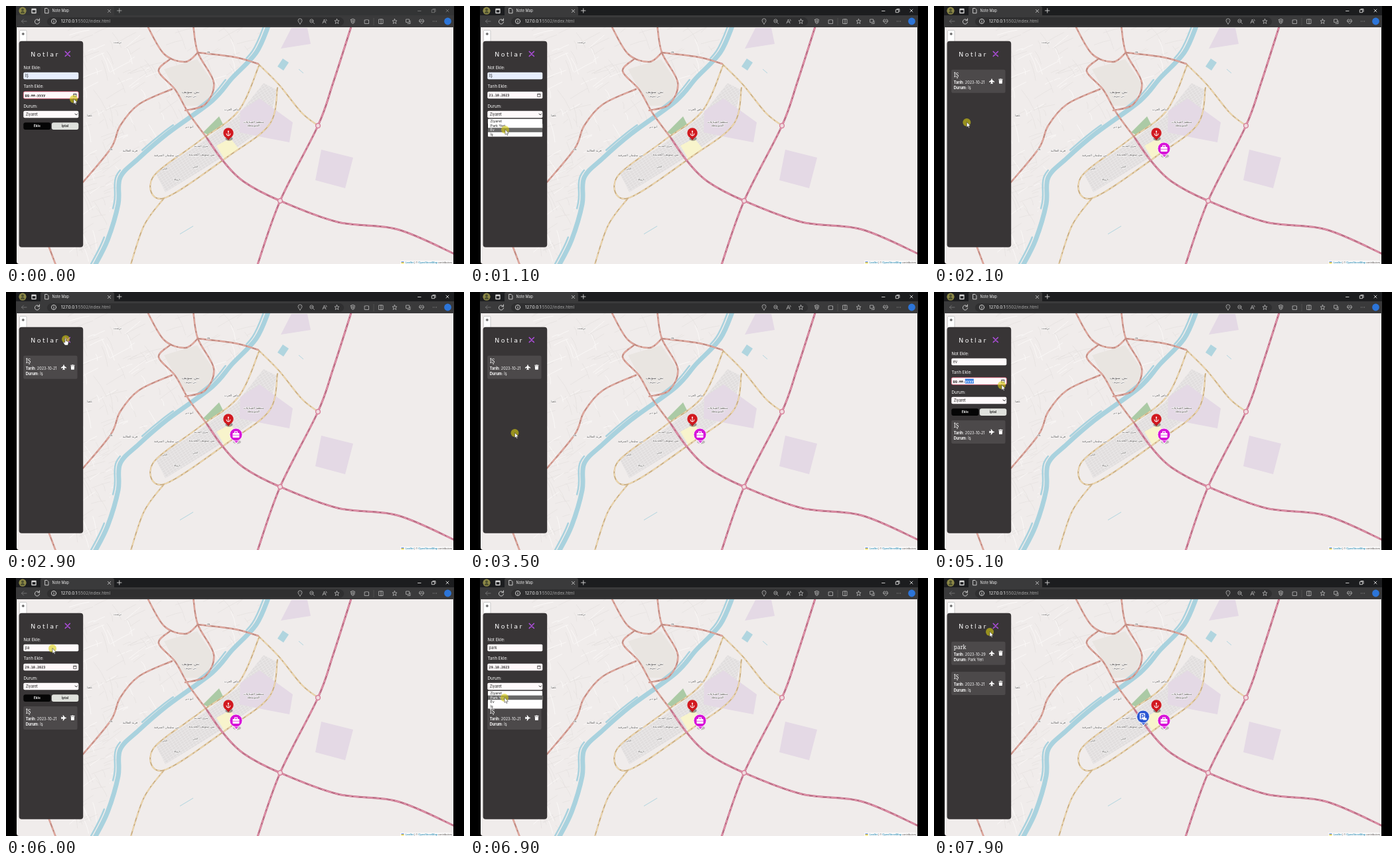
Recreate the animation shown at these times as an HTML page. Size 690 px wide and 388 px high, loop 8000 ms.

```html
<!DOCTYPE html>
<html lang="tr">
<head>
<meta charset="utf-8">
<title>Note Map</title>
<style>
  html, body { margin: 0; width: 100%; height: 100%; overflow: hidden; background: #000; }
  svg { display: block; width: 100%; height: 100%; }
  .ui text { font-family: Inter, "Open Sans", sans-serif; }
  .map text { font-family: "DejaVu Sans", sans-serif; text-anchor: middle; fill: #55504f; }
  .mono { font: bold 5.1px "DejaVu Sans Mono", monospace !important; }
  .field { font-size: 5.6px; fill: #222; }
  .label { font-size: 6.2px; fill: #fff; }
  .line { fill: none; stroke-linecap: round; stroke-linejoin: round; }
</style>
</head>
<body>
<svg viewBox="0 0 690 388" preserveAspectRatio="none">
  <defs>
    <clipPath id="view"><path d="M16 32H674V388H20Q16 388 16 384Z"/></clipPath>
    <clipPath id="west"><path d="M16 32H388L330 124 172 250 137 388H16Z"/></clipPath>
    <pattern id="blocks" width="5" height="3.5" patternUnits="userSpaceOnUse" patternTransform="rotate(-33)">
      <rect width="5" height="3.5" fill="#e0dddd"/>
      <path d="M0 .5H5M.5 0V3.5" stroke="#eceaea" stroke-width=".7"/>
    </pattern>
    <g id="plane" fill="#fff">
      <path d="M0-4.2Q.9-3.5.9-1.6L4 .4V1.5L.9.8 1.8 4 0 3.6-1.8 4-.9.8-4 1.5V.4L-.9-1.6Q-.9-3.5 0-4.2Z"/>
    </g>
    <g id="trash" fill="#fff">
      <path d="M-3.1-3.2H-1.2L-.8-3.8H.8L1.2-3.2H3.1V-2.3H-3.1ZM-2.7-1.7H2.7L2.3 3.7H-2.3Z"/>
    </g>
    <g id="pin">
      <ellipse cx="1.5" cy="11" rx="6" ry="3" fill="#444" opacity=".3"/>
      <path d="M-7 6 .5 14.5 7 6Z" fill="#fff"/>
      <path d="M-4 8 .5 12.5 5 8Z"/>
      <circle r="9.5" stroke="#fff" stroke-width=".8"/>
    </g>
  </defs>

  <rect width="690" height="388" fill="#000"/>

  <g class="map" clip-path="url(#view)">
    <rect x="15" y="32" width="660" height="356" fill="#f0eceb"/>
    <g id="fields" clip-path="url(#west)"></g>
    <path d="M238 95 288 80 314 118 300 150 268 150Z" fill="#e9e5e1"/>
    <path d="M225 250 292 207 348 166 388 116 408 126 396 178 332 224 240 280Z" fill="url(#blocks)"/>
    <g fill="#e4d9e5">
      <path d="M353 158 382 139 432 175 427 205 390 198 352 190Z"/>
      <path d="M475 216 523 228 511 274 466 262Z"/>
      <path d="M414 64 430 33H454L459 57Z"/>
    </g>
    <path d="M297 190 321 166 328 180 305 194Z" fill="#abcaa5"/>
    <path d="M317 210 338 199 351 215 329 230Z" fill="#f8f4cc"/>
    <path d="M417 79 426 85 418 97 409 91Z" fill="#b0d5df"/>
    <path d="M262 343 282 331M441 95 448 101" stroke="#b0d5df"/>
    <g id="roads"></g>
    <g id="places"></g>

    <g transform="translate(335 191)">
      <ellipse cx="1" cy="8.5" rx="5.5" ry="3.2" fill="#333" opacity=".45"/>
      <path d="M-5 5 0 11 5 5Z" fill="#b5161c"/>
      <circle r="7.7" fill="#d2191f"/>
      <path class="line" d="M0-2.5V4M-3 1Q-3 4 0 4 3 4 3 1" stroke="#fff"/>
      <circle cy="-2.5" r="1.1" fill="#fff"/>
    </g>
    <g id="parkPin" transform="translate(315 208.5)">
      <use href="#pin" fill="#2b57d3"/>
      <rect x="-5" y="-5" width="8" height="9" rx="1" fill="#fff"/>
      <path d="M-2.8 3V-3H-.7Q1.5-3 1.5-1.3T-.7.4H-2.8" fill="none" stroke="#2b57d3" stroke-width="1.3"/>
      <rect y="2" width="5.4" height="3" fill="#fff"/>
    </g>
    <g id="workPin" transform="translate(346.5 214.5)">
      <use href="#pin" fill="#d714d8"/>
      <rect x="-5" y="-2.6" width="10" height="7" rx="1" fill="#fff"/>
      <path d="M-2-2.6V-4.4H2V-2.6" fill="none" stroke="#fff" stroke-width="1.1"/>
      <path d="M-5 .8H5" stroke="#d714d8" stroke-width=".7"/>
    </g>

    <rect x="594" y="383" width="80" height="5" fill="#fff" opacity=".75"/>
    <path d="M595.5 384.3h4v1.4h-4Z" fill="#4c7be1"/><path d="M595.5 385.7h4v1.3h-4Z" fill="#ffd500"/>
    <text x="637" y="387" style="font:4.05px 'Liberation Sans',sans-serif"><tspan fill="#0078a8">Leaflet</tspan> | © <tspan fill="#0078a8">OpenStreetMap</tspan> contributors</text>
    <rect x="20.5" y="36.5" width="10.5" height="22" rx="1.5" fill="#fff" stroke="#bbb" stroke-width=".7"/>
    <path d="M23.7 42H27.9M25.8 39.9V44.1" stroke="#222" stroke-width=".9"/>
  </g>

  <g class="ui">
    <rect id="titleBar" x="15" width="660" height="15"/>
    <path d="M15 14H52V3Q52 0 55 0H160Q163 0 163 3V14H675V32H15Z" fill="#3a3a3b"/>
    <rect x="62" y="17" width="447" height="13" rx="6.5" fill="#2f2f30"/>
    <circle cx="25" cy="7.2" r="5.6" fill="#8c8847"/>
    <path d="M25 3.5a1.7 1.7 0 0 1 0 4Q28 8 28 11H22Q22 8 25 7.5a1.7 1.7 0 0 1 0-4Z" fill="#4e5130"/>
    <g class="line" stroke="#d8d8d8" stroke-width=".9">
      <path d="M39 4.5H45V10.5H39ZM39 5.5H45" stroke-width="1.3"/>
      <path d="M59 3.5H62L64 5.5V10.8H59Z"/>
      <path id="tabSigns" d="M153.5 5.5l4 4m0-4l-4 4M167.5 7h6.5m-3.2-3.2v6.4"/>
      <path id="windowSigns" d="M620.5 7.5h4.5M641.7 5.7h4v4h-4ZM643 4.5h4v4M663 5l4 4m0-4l-4 4"/>
      <path d="M31 23h-7.5m3-3l-3 3 3 3" stroke="#777"/>
      <path d="M50 21.5A3.6 3.6 0 1 0 50.6 24M50.5 19v2.8h-2.8"/>
      <circle cx="72" cy="23" r="3.6"/><path d="M72 22.5V25M72 21v.1"/>
    </g>
    <text x="69.5" y="9.4" font-size="5.5" fill="#e8e8e8">Note Map</text>
    <text x="83" y="25.3" font-size="6.3" fill="#f2f2f2">127.0.0.1<tspan fill="#a5a5a5">:5502/index.html</tspan></text>
    <g id="tools" class="line" stroke="#b8b8b8" stroke-width=".8"></g>
    <path d="M554 18V29" stroke="#555" stroke-width=".8"/>
    <circle cx="665.5" cy="23" r="5.4" fill="#2c75d9"/>

    <rect x="19.6" y="52.8" width="96.6" height="310" rx="4" fill="#383536"/>
    <text x="37.2" y="76" font-size="9.4" letter-spacing="2.5" fill="#fff" style="font-family:'DejaVu Sans',sans-serif">Notlar</text>
    <path class="line" d="M89.3 68.5l7 7m0-7l-7 7" stroke="#ad4ddb" stroke-width="1.7"/>

    <g id="form">
      <text class="label" x="26.5" y="95">Not Ekle:</text>
      <rect id="noteBox" x="26.3" y="99.7" width="83" height="10.6" rx="2"/>
      <text id="note" class="field" x="28.8" y="107"></text>
      <text class="label" x="26.5" y="123.3">Tarih Ekle:</text>
      <rect id="dateBox" x="26.3" y="128.7" width="83" height="10.6" rx="2" fill="#fff8fa" stroke-width=".8"/>
      <rect id="picked" x="46.8" y="130.6" width="13" height="7" fill="#2f7be5"/>
      <text id="date" class="mono" x="28.6" y="136.2" fill="#222"></text>
      <path d="M101.7 132h4.3v4.5h-4.3Zm0 1.2h4.3" fill="none" stroke="#333" stroke-width=".7"/>
      <text class="label" x="26.5" y="152.6">Durum:</text>
      <rect x="26.3" y="157.8" width="83" height="10.5" rx="2" fill="#fffafb"/>
      <text id="status" class="field" x="29.7" y="165"></text>
      <path class="line" d="M104 162l1.8 2 1.8-2" stroke="#222" stroke-width=".9"/>
      <rect x="26.3" y="175.3" width="41" height="10.8" rx="3" fill="#050505"/>
      <rect x="68.8" y="175.3" width="40.5" height="10.8" rx="3" fill="#dfe1dc"/>
      <g font-size="5" font-weight="600" text-anchor="middle">
        <text x="46.8" y="182.4" fill="#fff">Ekle</text><text x="89" y="182.4" fill="#222">İptal</text>
      </g>
    </g>
    <g id="cards"></g>
    <g id="menu">
      <rect x="27" y="169.8" width="82" height="26.8" rx="1" fill="#fff"/>
      <rect id="hover" x="27" width="82" height="6.6" fill="#676767"/>
      <g id="options"></g>
    </g>
  </g>

  <g id="cursor">
    <circle r="6" fill="#d9cf10" opacity=".6"/>
    <path id="arrow" d="M0-.5V7.5L1.8 5.9 3 8.5 4.2 8 3 5.4H5.4Z" fill="#fff" stroke="#222" stroke-width=".5"/>
    <path id="hand" d="M-1.2-1Q-.4-2 .4-1V2.6L3.8 3.6Q4.4 4 4 6L3.2 9H-1.3L-3.6 5.3Q-3.5 4-1.2 5Z" fill="#fff" stroke="#222" stroke-width=".5"/>
  </g>
</svg>
<script>
const LOOP = 8000, STEP = 100;
const $ = id => document.getElementById(id);
const show = (id, on) => { $(id).style.display = on ? '' : 'none'; };
const between = (t, from, to) => t >= from && t < to;

// Smooth path through a few "x,y" points
function curve(points) {
  const p = points.split(' ').map(s => s.split(',').map(Number));
  return p.slice(1).reduce((d, c, i) => {
    const a = p[i - 1] || p[i], b = p[i], e = p[i + 2] || c;
    const out = k => b[k] + (c[k] - a[k]) / 6, back = k => c[k] - (e[k] - b[k]) / 6;
    return `${d}C${out(0)},${out(1)} ${back(0)},${back(1)} ${c}`;
  }, `M${p[0]}`);
}
const line = (points, color, width, extra = '') =>
  `<path class="line" d="${curve(points)}" stroke="${color}" stroke-width="${width}" ${extra}/>`;

let seed = 17;
const random = () => (seed = seed * 16807 % 2147483647) / 2147483647;

function drawFields() {
  let out = '';
  for (let i = 0; i < 420; i++) {
    const x = 90 + random() * 290, y = 32 + random() * 356;
    const angle = (random() < .55 ? -.45 : 1.15) + (random() - .5) * .5;
    const len = 8 + random() * 30, dx = Math.cos(angle) * len, dy = Math.sin(angle) * len;
    out += `<path d="M${x} ${y}q${dx / 2 + 2} ${dy / 2 - 2} ${dx} ${dy}" fill="none"
      stroke="${i % 3 ? '#dfdad9' : '#fbf9f8'}" stroke-width="${i % 3 ? .5 : .9}"/>`;
  }
  $('fields').innerHTML = out;
}

function drawRoads() {
  const river = '396,28 377,70 341,108 310,143 243,192 200,229 172,258 169,298 153,352 133,392';
  const salmon = [
    '116,265 158,214 172,180 200,148 250,125',
    '212,28 238,72 270,84 289,70',
    '282,28 289,70 313,115 300,148 270,157',
    '289,70 345,77 380,87',
    '247,80 230,98 255,126 275,161 303,199',
    '60,350 76,392',
  ];
  const yellow = [
    '380,87 411,118 445,160 470,180',
    '409,123 397,178 335,226 238,289 221,258 290,204 350,158 381,90',
    '238,289 208,330 187,392',
  ];
  const trunk = [
    '521,28 493,115 470,180 413,293 378,392',
    '303,199 327,233 358,264 413,293 500,325 590,336 678,374',
  ];
  const layer = (list, edge, fill, width, dash) => list.map(p =>
    line(p, edge, width + .9) + line(p, fill, width) +
    line(p, dash, .8, 'stroke-dasharray="3 1 1 5 2 9" opacity=".7"')).join('');
  $('roads').innerHTML =
    line(river, '#a9d2de', 7) +
    line(river, '#a9d2de', 2.5, 'transform="translate(-6 -2)" stroke-dasharray="60 45"') +
    layer(yellow, '#d6b98e', '#f0dcb4', 1.3, '#86653d') +
    layer(salmon, '#c98d85', '#e2aca1', 1.6, '#82544e') +
    layer(trunk, '#c46a86', '#dc90a6', 2.1, '#6c3346') +
    [[470, 180], [413, 293]].map(([x, y]) =>
      `<circle cx="${x}" cy="${y}" r="3.4" fill="#f0dce0" stroke="#d7829b" stroke-width="1.5"/>`).join('');
}

function drawPlaces() {
  const label = (name, x, y, size = 4.5) =>
    `<text x="${x}" y="${y}" font-size="${size}" stroke="#fff" stroke-width="1" paint-order="stroke">${name}</text>`;
  $('places').innerHTML = label('بني سويف', 278, 131, 6) + label('بني سويف', 278, 137, 4) +
    label('بياض العرب', 340, 157) + label('منطقة الصناعات', 373, 176) + label('المتوسطة', 373, 181) +
    label('ابو دير', 276, 183) + label('قرية العلالية', 187, 219) + label('بني سليمان الشرقية', 242, 226) +
    label('بني سويف الجديدة', 295, 225, 5) + label('شرق المدينة', 294, 212, 4) +
    label('الحي', 239, 246, 4) + label('الحي', 285, 243, 4) + label('باروط', 258, 262, 4) +
    label('تزمنت', 168, 56) + label('بلفيا', 126, 166) + label('26', 158, 217, 4) + label('26', 305, 71, 4);
}

function drawTools() {
  const star = 'M0-3.5L1 -1H3.5L1.6 .8 2.3 3.5 0 2-2.3 3.5-1.6 .8-3.5-1H-1Z';
  const pages = 'M-3-3H1.5V1.5H-3ZM3-1V3.5H-1';
  const icons = {
    443: 'M0 4Q-3 .5-3-1A3 3 0 0 1 3-1Q3 .5 0 4ZM0-1v.1',
    461: 'M2-.5a2.6 2.6 0 1 0-5.2 0 2.6 2.6 0 1 0 5.2 0M1.5 1.5l2 2M-1.6-.5h2',
    480: 'M-3 3L-.5-3 2 3M-2 1H1M2-3Q4-2 3-.5',
    498.5: star,
    522.5: 'M-3-2.5L0-3.7 3-2.5Q3 2.5 0 4-3 2.5-3-2.5ZM-1-2V2M1-2V2',
    543.5: 'M-3-2H-1Q0-4 1-2H3V3.5H-3Z',
    565: 'M-3-3H3V3.5H-3ZM0-3.5V4',
    585.5: star,
    606: pages,
    626: 'M0 3.5L-3.5 0Q-3.5-3-1.5-3L0-1.7 1.5-3Q3.5-3 3.5 0ZM-3 0H3',
    646: 'M-2.5 0h.1M0 0h.1M2.5 0h.1',
  };
  $('tools').innerHTML = Object.entries(icons).map(([x, d]) => `<path d="${d}" transform="translate(${x} 23)"/>`).join('');
}

const OPTIONS = ['Ziyaret', 'Park Yeri', 'Ev', 'İş'];
const ROW = 6.6, MENU_TOP = 170;
const WORK = ['İŞ', '2023-10-21', 'İş'], PARK = ['park', '2023-10-29', 'Park Yeri'];

function card([title, date, status], y, planeAngle) {
  const row = (name, value, dy) =>
    `<text x="29.8" y="${y + dy}" font-size="5.5" fill="#fff"><tspan font-weight="700">${name}:</tspan> ${value}</text>`;
  return `<rect x="26.2" y="${y}" width="81.3" height="35" rx="2" fill="#4c494a"/>
    <text x="29.8" y="${y + 11}" fill="#fff" style="font:8.4px 'Noto Serif',serif">${title}</text>
    ${row('Tarih', date, 21.2)}${row('Durum', status, 29.4)}
    <use href="#plane" transform="translate(87 ${y + 17.5}) rotate(${planeAngle})"/>
    <use href="#trash" transform="translate(100.4 ${y + 17.3})"/>`;
}

const SPOT = {
  picker: [102, 140], day: [84, 188], select: [67, 165], add: [47, 181], close: [90, 71],
  home: [53, 186], work: [43, 193], park: [52, 180], rest: [67.5, 212], map: [315, 212], note: [70, 106], title: [84, 81],
};
// arrival, departure, spot
const VISITS = [
  [0, 200, 'picker'], [500, 700, 'day'], [900, 1000, 'select'], [1100, 1100, 'home'], [1300, 1400, 'work'],
  [1700, 2000, 'add'], [2700, 3000, 'close'], [3500, 3700, 'rest'], [4100, 4200, 'map'], [4700, 5200, 'picker'],
  [5400, 5700, 'day'], [6000, 6300, 'note'], [6600, 6700, 'select'], [6900, 7100, 'park'], [7300, 7600, 'add'],
  [7900, LOOP, 'title'],
];

function cursorAt(t) {
  const i = VISITS.findIndex(v => v[1] >= t);
  const [arrive, , spot] = VISITS[i], goal = SPOT[spot];
  if (t >= arrive) return goal;
  const [, leave, last] = VISITS[i - 1];
  const k = (t - leave) / (arrive - leave), ease = k * k * (3 - 2 * k);
  return SPOT[last].map((v, axis) => v + (goal[axis] - v) * ease);
}

const typed = (text, t, start) => text.slice(0, Math.max(0, (t - start) / STEP + 1));

function render(t) {
  const [x, y] = cursorAt(t);
  const second = t >= 4200, parked = t >= 7400, saved = t >= 1800;
  const form = !saved || second && !parked;
  const open = between(t, 1000, 1400) || between(t, 6700, 7100);
  const dated = second ? t >= 5500 : t >= 700;
  const yearPicked = between(t, 4900, 5500);
  const hovered = Math.max(0, Math.min(3, Math.floor((y - MENU_TOP) / ROW)));
  const status = second ? (t >= 7100 ? 1 : 0) : (t >= 1400 ? 3 : 0);
  const active = t >= 700;

  $('titleBar').setAttribute('fill', active ? '#1c1d1f' : '#333435');
  $('windowSigns').setAttribute('opacity', active ? 1 : .4);
  $('tabSigns').setAttribute('opacity', active ? 1 : .7);
  show('form', form);
  show('menu', open);
  show('workPin', saved);
  show('parkPin', parked);
  show('picked', yearPicked);
  $('note').textContent = !second ? 'İŞ' : t < 5800 ? typed('ev', t, 4600) : typed('park', t, 5900);
  $('noteBox').setAttribute('fill', second ? '#fffafb' : '#e6edfc');
  $('date').innerHTML = dated ? (second ? '29.10.2023' : '21.10.2023')
    : yearPicked ? 'gg.aa.<tspan fill="#fff">yyyy</tspan>' : 'gg.aa.yyyy';
  $('dateBox').setAttribute('stroke', yearPicked || !active ? '#df5f76' : 'none');
  $('status').textContent = OPTIONS[status];
  $('hover').setAttribute('y', MENU_TOP + hovered * ROW);
  $('options').innerHTML = OPTIONS.map((name, i) =>
    `<text x="30.5" y="${MENU_TOP + i * ROW + 5.2}" font-size="5.4" fill="${i === hovered ? '#fff' : '#222'}">${name}</text>`).join('');
  const cards = parked ? [PARK, WORK] : saved ? [WORK] : [];
  $('cards').innerHTML = cards.map((c, i) => card(c, (form ? 193 : 95.7) + i * 45.4, form ? 90 : 0)).join('');

  const near = ([sx, sy]) => Math.hypot(x - sx, y - sy) < 6;
  const hand = near(SPOT.close) || form && !open && near(SPOT.add);
  show('hand', hand);
  show('arrow', !hand);
  $('cursor').setAttribute('transform', `translate(${x} ${y})`);
}

drawFields();
drawRoads();
drawPlaces();
drawTools();
const start = performance.now();
let shown = -1;
function tick() {
  const t = Math.floor((performance.now() - start) % LOOP / STEP) * STEP;
  if (t !== shown) render(shown = t);
  requestAnimationFrame(tick);
}
tick();
</script>
</body>
</html>
```
